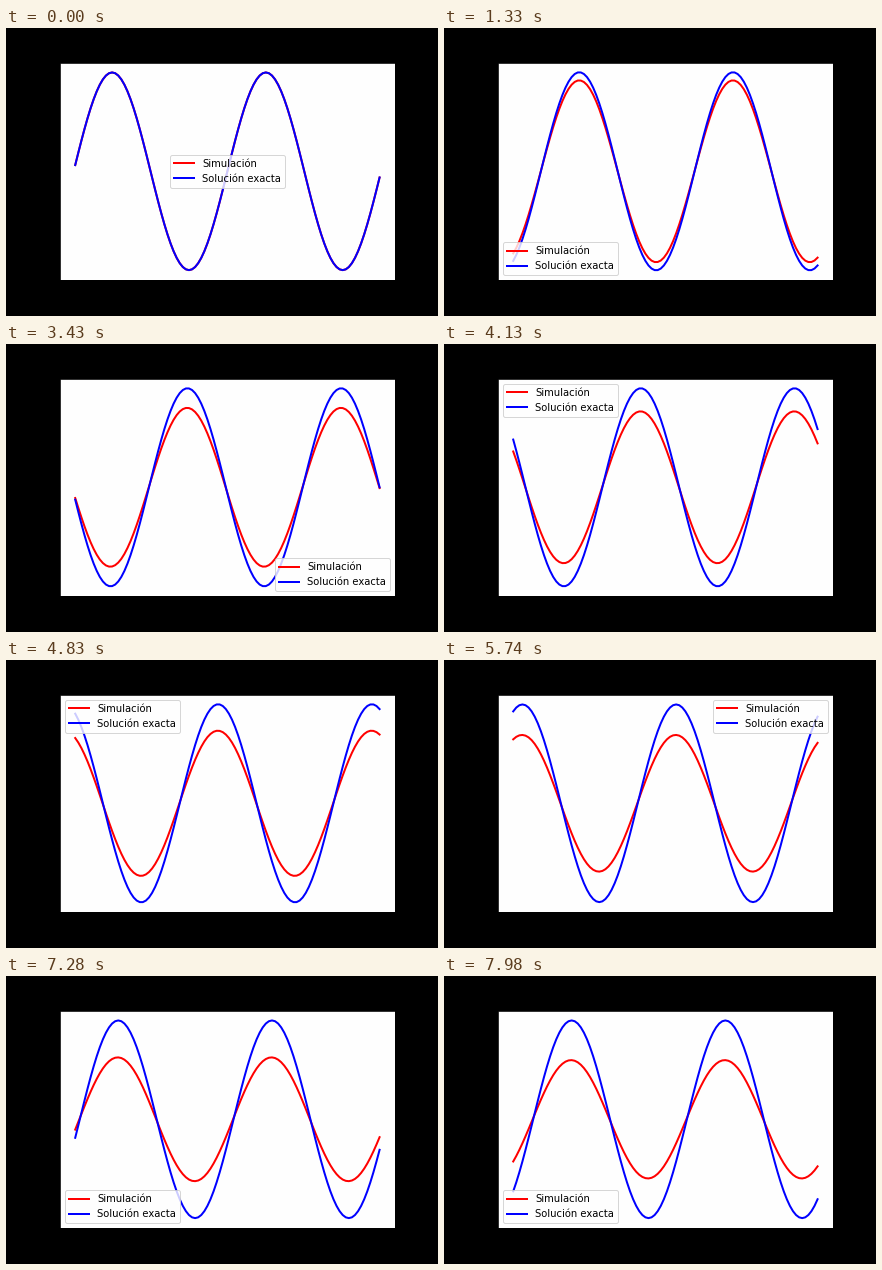
Animation of 432x288 px, one loop 8000 ms. Source, as a matplotlib script:

```python
import numpy as np
import matplotlib.pyplot as plt
from matplotlib.animation import FuncAnimation

LOOP_MS = 8000
TICK_MS = 20
STEP_MS = 70

CELLS = 100
WAVES = 2
COURANT = 0.5       # cells travelled per step
DAMPING = 0.0045    # amplitude decay of the simulation per step
LAG = 0.0002        # phase error of the simulation per step, radians

x = (np.arange(CELLS) + 0.5) / CELLS
k = 2 * np.pi * WAVES

fig = plt.figure(figsize=(6, 4), dpi=72, facecolor="black")
ax = fig.add_axes([0.125, 0.125, 0.775, 0.755], facecolor="#fefefe")
ax.set_xticks([])
ax.set_yticks([])


def exact(step):
    return np.sin(k * (x - COURANT * step / CELLS))


def simulated(step):
    phase = k * (x - COURANT * step / CELLS) + LAG * step
    return np.exp(-DAMPING * step) * np.sin(phase)


sim_line, = ax.plot(x, simulated(0), color="red", lw=2, label="Simulación")
exact_line, = ax.plot(x, exact(0), color="blue", lw=2, label="Solución exacta")
ax.legend(loc="best", fontsize=10)


def update(frame):
    step = (frame * TICK_MS + TICK_MS // 2) // STEP_MS
    sim_line.set_ydata(simulated(step))
    exact_line.set_ydata(exact(step))
    ax.relim()
    ax.autoscale_view()
    return sim_line, exact_line


anim = FuncAnimation(fig, update, frames=LOOP_MS // TICK_MS,
                     interval=TICK_MS, repeat=True, repeat_delay=0)
plt.show()
```
